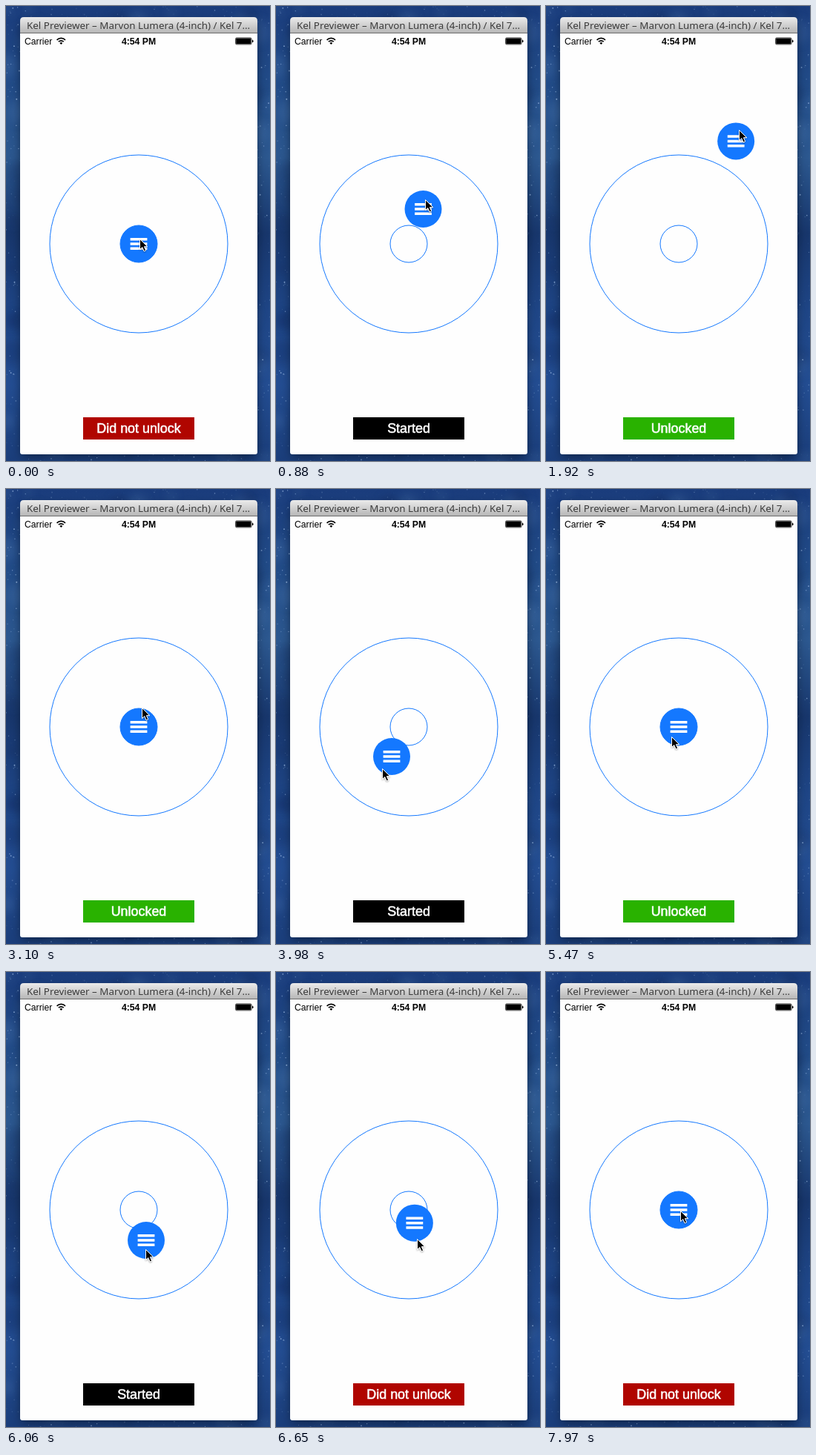
Write an HTML page with a canvas that moves like this. It is 356 px wide and 614 px high and loops after 8000 ms.

```html
<!DOCTYPE html>
<html lang="en">
<head>
<meta charset="utf-8">
<title>Unlock gesture</title>
<style>
  html, body { margin: 0; width: 356px; height: 614px; overflow: hidden; background: #1c4180; }
  canvas, svg { position: absolute; left: 0; top: 0; display: block; }
  text { font-family: "Liberation Sans", Arial, sans-serif; }
  .title { font: 13.4px "Noto Sans", "Open Sans", sans-serif; fill: #3b3b3b; }
  .ring { fill: none; stroke: #1478ff; stroke-width: 1; }
  .label { font-size: 17.9px; fill: #fff; stroke: #fff; stroke-width: .55; text-anchor: middle; }
</style>
</head>
<body>
<canvas id="sky" width="356" height="614"></canvas>
<svg width="356" height="614" viewBox="0 0 356 614">
  <defs>
    <linearGradient id="bar" x2="0" y2="1">
      <stop offset="0" stop-color="#ebebeb"/>
      <stop offset="1" stop-color="#b4b4b4"/>
    </linearGradient>
    <filter id="soft" x="-50%" y="-50%" width="200%" height="200%">
      <feDropShadow dx="0" dy="1" stdDeviation=".8" flood-opacity=".4"/>
    </filter>
  </defs>

  <path d="M19 37V20q0-5 5-5H334q5 0 5 5V37z" fill="url(#bar)"/>
  <path d="M19 36.5H339" stroke="#6e6e6e"/>
  <path d="M19 37H339V602q0 3-3 3H22q-3 0-3-3z" fill="#fefefe"/>
  <text class="title" x="28" y="31">Kel Previewer – Marvon Lumera (4-inch) / Kel 7…</text>

  <text x="25" y="51.5" font-size="12.2">Carrier</text>
  <g fill="none" stroke="#000" stroke-width="1.7">
    <path d="M68.6 45.8a8 8 0 0 1 11.4 0M70.9 48.2a4.8 4.8 0 0 1 6.8 0"/>
    <path d="M74.3 52l-1.9-2.1a2.7 2.7 0 0 1 3.8 0z" fill="#000" stroke="none"/>
  </g>
  <text x="179" y="51.5" font-size="12.2" font-weight="700" text-anchor="middle">4:54 PM</text>
  <rect x="309.5" y="42.9" width="21.6" height="9" rx="1.5" fill="none" stroke="#000" stroke-width=".7"/>
  <rect x="310.2" y="43.6" width="20.2" height="7.6" rx=".7"/>
  <path d="M332 45.6q1.6.4 1.6 1.8t-1.6 1.8z"/>

  <circle class="ring" cx="179" cy="321" r="120"/>
  <circle class="ring" cx="179" cy="321" r="25"/>
  <rect id="plate" x="104" y="555" width="150" height="30"/>
  <text id="label" class="label" x="179" y="576"></text>

  <g id="ball">
    <circle r="25" fill="#1478ff"/>
    <path d="M-10.5 -6.3h21M-10.5 0h21M-10.5 6.3h21" stroke="#fff" stroke-width="3.5" stroke-linecap="square"
      transform="scale(.93 1)"/>
  </g>
  <path id="cursor" d="M-.5 .5V14.6L2.8 11.6 5.1 16.9 7.6 15.8 5.4 10.7H9.8z"
    stroke="#fff" stroke-width="1" filter="url(#soft)"/>
</svg>
<script>
const $ = id => document.getElementById(id);
const LOOP = 8000, STEP = 147.7, HOME = [179, 321], REST = [181, 314];

// Pointer moves, timed in steps
const moves = [
  { from: 0, to: 3, at: [179, 318] },
  { from: 4, to: 6, at: [202, 261] },
  { from: 6, to: 11, at: [261, 167] },
  { from: 17, to: 21, at: [184, 295] },
  { from: 21, to: 25, at: [172, 327] },
  { from: 25, to: 30, at: [91, 473] },
  { from: 32, to: 38, at: [176, 324] },
  { from: 39, to: 41, at: [189, 374] },
  { from: 41, to: 44, at: [191, 360] },
  { from: 47, to: 52, at: [182, 322] }
];

// Ball drags: first step, release, pointer offset from the ball, result
const drags = [
  { from: 5, to: 12.75, grip: [3.5, -13], end: "Unlocked" },
  { from: 26, to: 31.12, grip: [-12, 16], end: "Unlocked" },
  { from: 40, to: 43.8, grip: [0, 12], end: "Did not unlock" }
];
const colors = { "Started": "#000", "Unlocked": "#29b200", "Did not unlock": "#b00500" };

const ease = u => (1 - Math.cos(Math.PI * Math.min(1, Math.max(0, u)))) / 2;
const mix = (a, b, k) => a.map((v, i) => v + (b[i] - v) * k);

const pointer = n => moves
  .reduce((p, m) => mix(p, m.at, ease((n - m.from) / (m.to - m.from))), REST)
  .map(Math.round);

function pose(n) {
  const drag = drags.filter(d => n >= d.from).pop();
  if (!drag) return { ball: HOME, text: "Did not unlock" };
  const held = pointer(Math.min(n, Math.ceil(drag.to))).map((v, i) => v - drag.grip[i]);
  return {
    ball: mix(held, HOME, ease((n - drag.to) / 3)),
    text: n < drag.to ? "Started" : drag.end
  };
}

function place(id, [x, y]) {
  $(id).setAttribute("transform", `translate(${x} ${y})`);
}

function draw(ms) {
  const n = Math.floor((ms % LOOP + 10) / STEP);
  const { ball, text } = pose(n);
  place("cursor", pointer(n));
  place("ball", ball);
  $("label").textContent = text;
  $("plate").setAttribute("fill", colors[text]);
}

function paintSky() {
  const c = $("sky").getContext("2d");
  const g = c.createLinearGradient(0, 0, 0, 614);
  ["#1a3c7c", "#214b88", "#2c5890", "#17366c", "#1e4586", "#234d92", "#1a3d7a"]
    .forEach((color, i, all) => g.addColorStop(i / (all.length - 1), color));
  c.fillStyle = g;
  c.fillRect(0, 0, 356, 614);
  let seed = 7;
  const rnd = () => (seed = seed * 16807 % 2147483647) / 2147483647;
  const dot = (color, r) => {
    c.fillStyle = color;
    c.beginPath();
    c.arc(rnd() * 356, rnd() * 614, r, 0, 7);
    c.fill();
  };
  c.filter = "blur(6px)";
  for (let i = 0; i < 160; i++) dot(i % 2 ? "rgba(90,135,190,.2)" : "rgba(8,28,75,.2)", 5 + rnd() * 12);
  c.filter = "none";
  for (let i = 0; i < 2500; i++) dot(`rgba(165,195,235,${rnd() ** 3 * .8})`, .4 + rnd() * .6);

  c.shadowColor = "rgba(0,0,0,.5)";
  c.shadowBlur = 14;
  c.shadowOffsetY = 5;
  c.fillStyle = "#1c4180";
  c.fillRect(21, 18, 316, 584);
}

paintSky();
const start = performance.now();
function tick() {
  draw(performance.now() - start);
  requestAnimationFrame(tick);
}
draw(0);
requestAnimationFrame(tick);
</script>
</body>
</html>
```
